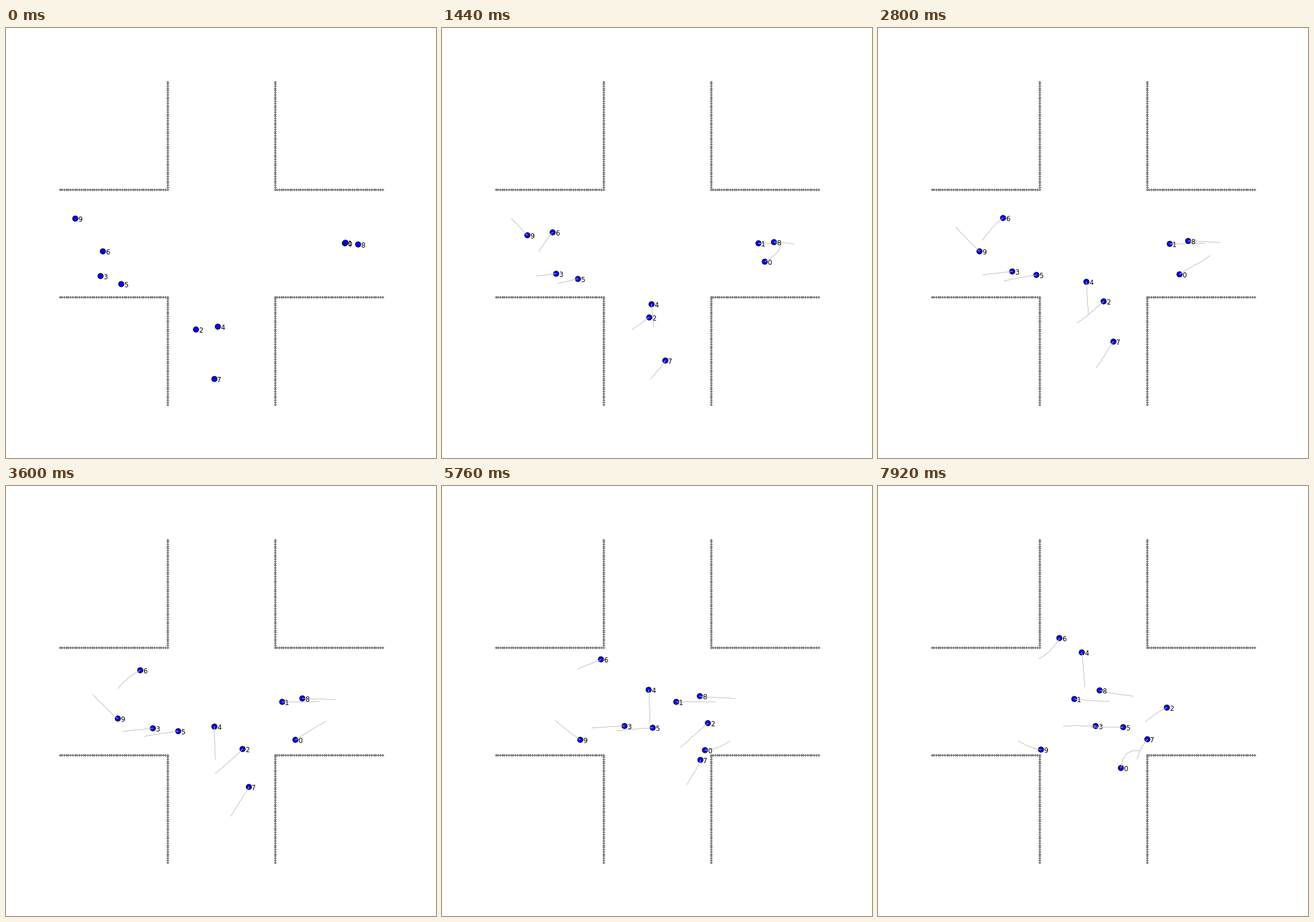
Recreate the animation shown at these times as a matplotlib script. Size 748 px wide and 748 px high, loop 8 s.

```python
import matplotlib.pyplot as plt
import numpy as np
from matplotlib.animation import FuncAnimation
from matplotlib.patches import Circle, Rectangle

SIZE, DPI = 748, 100
FRAMES, INTERVAL = 100, 80
TRAIL = 25
UNIT = SIZE / 20
PIXEL = 72 / DPI

# Points each walker passes at even intervals; a smooth curve joins them.
ROUTES = [
    [(589.5, 374.5), (557, 408.5), (514, 434), (477.5, 455), (446, 460), (422, 490)],
    [(590.5, 373), (512, 375), (423, 375), (341, 370)],
    [(329.5, 524), (388, 478.5), (451, 421.5), (502, 385)],
    [(164, 431), (229, 423.5), (303.5, 417.5), (378, 417.5)],
    [(368, 519.5), (362.5, 445.5), (360, 368.5), (354, 289.5)],
    [(199.5, 444.5), (270, 430), (351, 421), (426, 419)],
    [(168, 387.5), (194, 352), (224, 325), (257, 309), (286.5, 296), (315.5, 264.5)],
    [(362, 610), (390, 574.5), (415, 535), (440, 494.5), (452, 469), (468, 440)],
    [(612, 375.5), (543.5, 370), (462.5, 366.5), (385, 355)],
    [(120, 330.5), (173, 385), (230, 434), (283, 458)],
]

fig = plt.figure(figsize=(SIZE / DPI, SIZE / DPI), dpi=DPI, facecolor="white")
ax = fig.add_axes([0, 0, 1, 1])
ax.set_xlim(-0.5, SIZE - 0.5)
ax.set_ylim(SIZE - 0.5, -0.5)
ax.axis("off")


def smooth_path(route):
    """One position per frame on the polynomial through the route's points."""
    u = np.linspace(0, 1, len(route))
    coeffs = np.polyfit(u, np.array(route), len(route) - 1)
    now = np.linspace(0, 1, FRAMES)
    return np.rint(np.column_stack([np.polyval(c, now) for c in coeffs.T]))


def wall_dot(x, y):
    for w, h in ((5, 1), (3, 3), (1, 5)):
        ax.add_patch(Rectangle((x - w / 2, y - h / 2), w, h, fc="#808080", ec="none", zorder=1))


def draw_walls():
    near, far = 2.5, 7.5
    for step in np.linspace(near, far, 51):
        for sx in (-1, 1):
            for sy in (-1, 1):
                for dx, dy in ((step, near), (near, step)):
                    wall_dot(np.floor((10 + sx * dx) * UNIT + 0.5),
                             np.floor((10 + sy * dy) * UNIT + 0.5))


class Walker:
    def __init__(self, number, route):
        self.path = smooth_path(route)
        z = 2 + number
        self.discs = [ax.add_patch(Circle((0, 0), r, fc=color, ec="none", zorder=z))
                      for r, color in ((5.2, "black"), (4.2, "#0000ff"))]
        self.trail, = ax.plot([], [], color="#c0c0c0", lw=PIXEL, snap=False, zorder=z + 0.2)
        self.label = ax.text(0, 0, str(number), family="DejaVu Sans", size=11.8 * PIXEL,
                             ha="center", va="baseline", zorder=z + 0.3)

    def show(self, frame):
        points = self.path[max(0, frame - TRAIL):frame + 1]
        x, y = points[-1]
        for disc in self.discs:
            disc.center = (x, y)
        self.trail.set_data(*points.T)
        self.label.set_position((x + 8.3, y + 5.5))
        return [*self.discs, self.trail, self.label]


draw_walls()
walkers = [Walker(number, route) for number, route in enumerate(ROUTES)]


def update(frame):
    return [artist for walker in walkers for artist in walker.show(frame)]


anim = FuncAnimation(fig, update, frames=FRAMES, interval=INTERVAL,
                     init_func=lambda: update(0), repeat=True, repeat_delay=0, blit=True)
plt.show()
```
